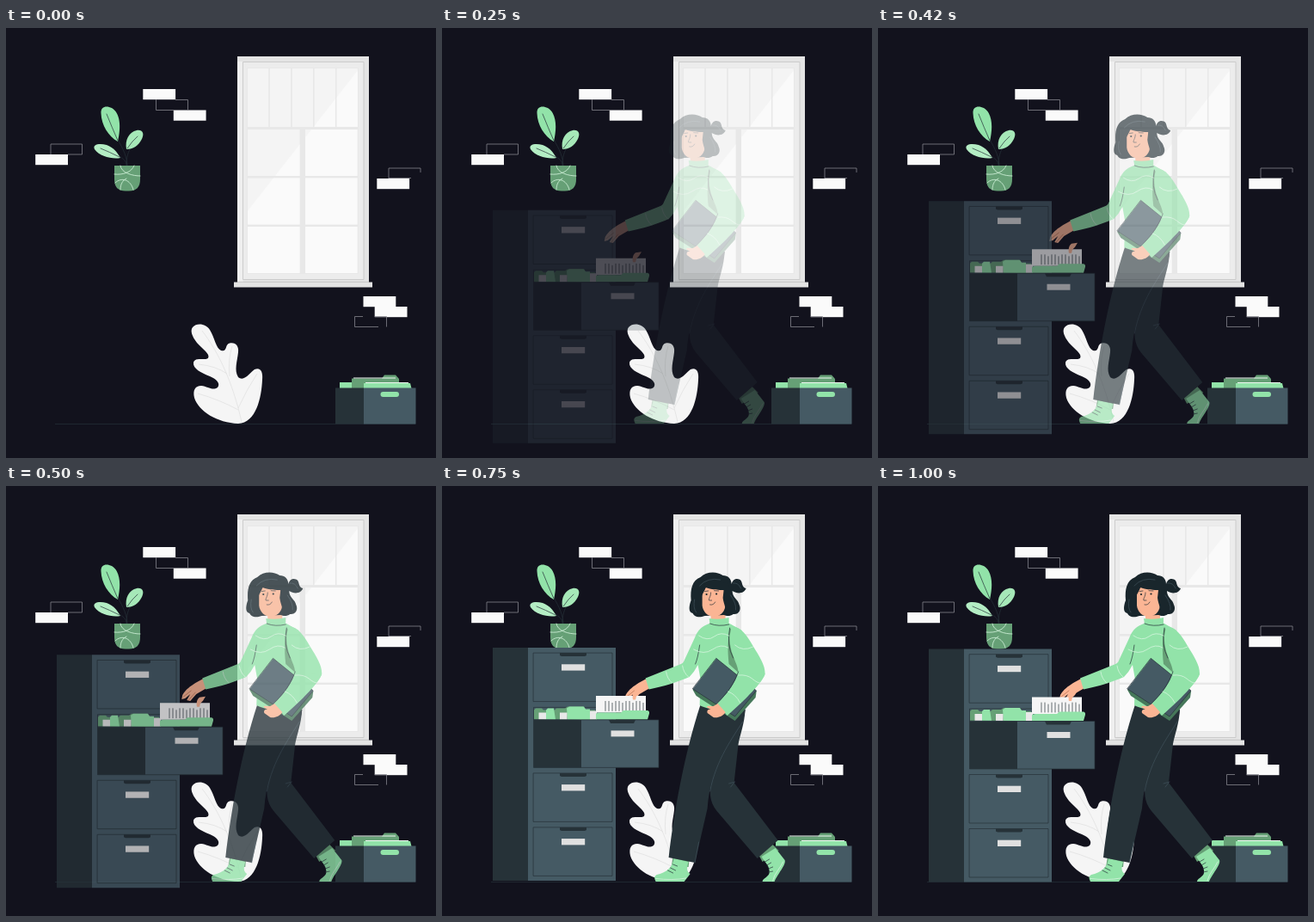
An HTML page that plays this animation: 500x500 px, repeating every 1.04 s.

```html
<!DOCTYPE html>
<html lang="en">
<head>
<meta charset="utf-8">
<title>Filing</title>
<style>
html, body { margin: 0; width: 100%; height: 100%; overflow: hidden; background: #12121d; }
svg { display: block; width: 100vw; height: 100vh; }
.dark { fill: #263238; }
.slate { fill: #455a64; }
.mint { fill: #92e3a9; }
.moss { fill: #66a076; }
.skin { fill: #fbb594; }
.line, .pale, .crease { fill: none; stroke-linecap: round; stroke-linejoin: round; }
.line { stroke: #263238; stroke-width: .7; }
.pale { stroke: #d6f5df; stroke-width: .8; }
.crease { stroke: #465862; stroke-width: .6; }
</style>
</head>
<body>
<svg viewBox="0 0 500 500">
  <path d="M57 460.5H476" stroke="#263238" stroke-width=".7"/>

  <g id="window">
    <path d="M269 33H422V296H269Z" fill="#e4e4e4"/>
    <path d="M269 39H275.500V296H269Z" fill="#efefef"/>
    <path d="M275.5 39.5H416V292.5H275.5Z" fill="#ececec" stroke="#c4c4c4" stroke-width=".8"/>
    <path d="M280 46H410V286H280Z" fill="#e8e8e8"/>
    <g id="panes" fill="#f4f4f4"></g>
    <g id="shine" fill="#fafafa" clip-path="url(#glare)"></g>
    <clipPath id="glare"><path d="M410 48L280 214V286H410Z"/></clipPath>
    <path d="M265 295.500H426V301.500H265Z" fill="#e3e3e3"/>
    <path d="M269 295.300H422" stroke="#bdbdbd" stroke-width=".8"/>
  </g>

  <g id="bricks" fill="#fafafa"></g>
  <g fill="none" stroke="#85858c" stroke-width=".8">
    <path d="M174.500 83V95.500H195M197 83.500H211.500V95.500"/>
    <path d="M52 147V135H88.500V147H72"/>
    <path d="M445 175V163H460M460 163H482V168M445 174.500H471"/>
    <path d="M415 335.500H405.500V347.500H433M429 335.500H442.500V347.500"/>
  </g>

  <g id="houseplant">
    <path class="line" d="M141 161C141 150 136 140 130 130M141 161C140 155 136 151 131 149M140 160C140 150 142 144 146 137"/>
    <path class="mint" d="M130 132C119 126 111 113 110.500 99C110 91 117 90 123 93C133 99 134 115 130 132Z"/>
    <path fill="#b4edc4" d="M133 151C124 153 108 149 103 141C100 135 109 134 117 136C125 139 129 144 133 151Z"/>
    <path fill="#a6e8b8" d="M140 141C138 130 143 121 152 119C159 118 161 123 158 129C154 137 148 141 140 141Z"/>
    <path class="line" d="M130 131Q123 115 117 100M132 150Q120 144 110 140M141 140Q147 131 153 126"/>
    <path class="moss" d="M126 160H156V176Q156 189.500 143 189.500H139Q126 189.500 126 176Z"/>
    <path class="pale" d="M126 170C136 171 146 168 149 160M133 160C134 169 148 172 156 172M127 180C134 173 145 176 148 188M133 188C133 181 136 177 140 175"/>
  </g>

  <g id="leaf">
    <path fill="#f5f5f5" d="M270 460C246 459 224 446 219 430C217 421 220 416 227 416C235 417 240 422 246 418C250 413 244 408 237 405C227 401 217 396 218 389C220 382 230 387 235 384C238 379 228 373 222 366C216 358 214 352 217 348C222 342 233 344 237 351C243 361 244 372 250 375C258 377 254 368 260 366.500C267 365 271 370 270 377C269 387 265 398 270 406C277 412 284 400 289 397C296 394 299 400 298 409C297 430 291 459 270 460Z"/>
    <path fill="none" stroke="#dedede" stroke-width=".7" d="M228 352C247 377 263 410 274 458M224 391Q244 393 257 402M263 370Q258 385 260 405M223 425Q248 432 270 444M292 402Q280 420 270 442"/>
  </g>

  <g id="box">
    <path class="mint" d="M388 412H403V419H388Z"/>
    <path class="moss" d="M402 419V407.500H437L440 403.500H453L457 408V419Z"/>
    <path class="mint" d="M416 413H470L471.500 419H416Z"/>
    <path d="M404 407H453M418 412.500H468" stroke="#f0faf3"/>
    <path class="dark" d="M383 418.500H416V460.500H383Z"/>
    <path class="slate" d="M416 418.500H476.500V460.500H416Z"/>
    <rect class="mint" x="435.500" y="423" width="21.500" height="6" rx="3"/>
  </g>

  <g id="woman">
    <g id="shoes">
      <path class="moss" d="M267 431L286 434L285 443H265Z"/>
      <path class="mint" d="M268 433L285 437C282 446 284 449 287 451L280 460H247C245 456 245 454 248 452C259 450 267 443 268 433Z"/>
      <path class="pale" d="M247 456.500C259 458 272 458 282 456"/>
      <path class="line" d="M264 444L270 447M261 447L267 450M267 440L272 442"/>
      <path class="moss" d="M366 428L383 417L390 424L371 437Z"/>
      <path class="mint" d="M370 431L386 421L397 435C399 440 388 452 385 460H371C371 456 378 455 379 450C380 442 374 438 370 431Z"/>
      <path class="pale" d="M395 437C392 444 385 450 383 459"/>
      <path class="line" d="M374 437L379 434M376 441L381 438M378 445L383 443M378 449L383 448"/>
    </g>

    <g id="trousers">
      <path class="dark" d="M309 260L351 260C350 277 345 289 343 300L338 345L389 412L365 433L318 378C309 367 309 355 312 340Z"/>
      <path class="dark" d="M299 254C314 261 335 263 351 260C350 275 339 288 330 302C316 326 309 348 307 375L292.500 438L262 432C268 380 280 312 299 254Z"/>
      <path class="crease" d="M348 274C337 292 317 318 310 355M339 344L332 346M338 345L334 350M297 414L292.500 438"/>
    </g>

    <g id="body">
      <path class="skin" d="M238 223L227 229C221 233 216 236 212 243L211 248L215 247L221 242L217 249L221 250L228 242L240 235Z"/>
      <path class="line" style="stroke:#b56e51" d="M213 245L222 238M219 249L227 240"/>
      <path class="mint" d="M309 160C301 163 296 167 292.500 176L280 203Q279 206 275 207.500L235 223.500L239 236.500C257 233 272 228 286 222Q292 216 296 208L299 225L298 255C310 261 332 263 345 256L347 168L333 160Z"/>
      <path class="moss" d="M333 165L349 182L343 217L332 207C330 191 331 177 333 165Z"/>
      <path class="mint" d="M335 163C347 164 353 174 360 186C368 199 374 208 374 218C373 226 350 250 330 267L319 253C332 240 341 226 343 216C342 205 332 194 333 174Z"/>
      <path class="skin" d="M311 143H328V157H311Z"/>
      <path class="mint" d="M309 154Q321 156 332 153V162Q321 165 310 161Z"/>
      <path class="line" d="M310 160Q320 164 332 161M298 185Q296 200 293 207M333 165Q329 185 337 200"/>
      <path class="pale" d="M297 174Q307 181 315 175T332 174M291 190Q303 197 313 190T331 188M259 216Q260 224 266 229M278 209Q279 217 285 222M339 185Q348 193 360 187"/>
    </g>

    <g id="binder">
      <path fill="#46785a" d="M290 237L319 205L364 239L363 246L339 273L294 244Z"/>
      <path class="slate" d="M317.500 200.500L364 238L339 268L290 236Z"/>
      <path class="line" d="M317.500 200.500L364 238L339 268L290 236Z"/>
      <path class="mint" d="M343 216L374 218C373 226 350 250 330 267L318 253C331 241 340 228 343 216Z"/>
      <path class="line" d="M343 216C338 229 332 239 318 253"/>
      <path class="pale" d="M343 220Q353 219 359 224T368 229M331 239Q340 242 345 252"/>
      <path class="skin" d="M319 253L328 263C325 268 319 270 314 269L307 264C306 261 308 259 311 260L306 257C307 255 311 256 314 256Z"/>
    </g>

    <g id="head" fill="#19262c">
      <path d="M304 151C296 154 291 151 290 148C284 147 286 138 288 133C287 120 289 110 299 106C306 99 318 99 325 104C331 104 335 108 335 114C337 107 343 107 346 110C348 113 347 118 352 119C350 125 342 126 336 122C336 130 343 132 344 138C347 144 343 150 337 149C333 152 329 151 326 150Z"/>
      <path class="skin" d="M301 123C303 115 322 113 326 120L328 133C329 143 325 149 319 151C310 154 302 148 301 139Z"/>
      <path d="M299 132C301 125 304 122 305 118C313 121 322 121 326 121L325 130C326 138 330 144 328 149L341 143L331 113L303 108L295 116Z"/>
      <circle cx="306" cy="126" r="1.100"/>
      <circle cx="317.500" cy="125.500" r="1.100"/>
      <path class="line" d="M304 122.500L308 122M315 121.700L320 122M311 124C311 129 308 131 309 133H312M310 138Q314 139 316 135"/>
      <path class="crease" d="M298 116Q307 106 322 109M292 132Q290 142 294 147M334 127Q341 137 340 144M337 113Q343 112 346 119"/>
    </g>
  </g>

  <g id="cabinet">
    <path class="dark" d="M59 189.500H100V460.500H59Z"/>
    <path class="slate" d="M100 189.500H202V460.500H100Z"/>
    <g id="drawers"></g>
    <path class="dark" d="M106.500 259H162V329H106.500Z"/>
    <path class="slate" d="M106 255H198V273.500H106Z"/>
    <path class="line" d="M106.500 273V259H198V273"/>
    <path class="moss" d="M107 273V262L109 260H116L118 262H131L133 260H143L146 258H164L167 262H178V273Z"/>
    <path class="mint" d="M121 273V262L123 260H130L132 273ZM146 273L145 260L148 258H165L167 261H172V273Z"/>
    <path fill="#e8e8e8" d="M112.500 265H121V273H112.500ZM137 265H145.500V273H137ZM172 263H180V273H172Z"/>
    <path fill="#f5f5f5" d="M179 245.500H237V265H179Z"/>
    <path id="print" class="line"/>
    <path class="skin" d="M222 250C221 246 222 241 225 239L232 238L229 243L226 246L225 250Z"/>
    <path class="mint" d="M179 273V266L183 265H208L211 262.500H239Q241.500 263 241 266L239 273Z"/>
    <path class="slate" d="M162 273.500H252V329H162Z"/>
    <path class="line" d="M162 273.500H252V329H106.500V273.500Z"/>
    <path class="dark" d="M194 273.500H225L223 277.500H196Z"/>
    <path fill="#e0e0e0" d="M196.500 286H223.500V293H196.500Z"/>
  </g>
</svg>
<script>
const $ = id => document.getElementById(id);
const rect = (x, y, w, h) => `<rect x="${x}" y="${y}" width="${w}" height="${h}"/>`;

let panes = '';
for (let i = 0; i < 5; i++) panes += rect(281 + i * 25.9, 47, 24.2, 68);
for (let i = 0; i < 3; i++)
  for (const x of [281, 348]) panes += rect(x, 118 + i * 56.5, 60.5, 54);
$('panes').innerHTML = $('shine').innerHTML = panes;

$('bricks').innerHTML = [[159.3, 71], [194.8, 95.5], [34.2, 147], [431.3, 175], [415.5, 312], [428.7, 324]]
  .map(([x, y]) => rect(x, y, 37.8, 12.2)).join('');

$('drawers').innerHTML = [195.7, 335.5, 398.5].map(y => `
  <path class="line" d="M106.5 ${y}H198V${y + 56.5}H106.5Z"/>
  <path class="dark" d="M137 ${y}H168V${y + 3}L166 ${y + 4}H139L137 ${y + 3}Z"/>
  <g fill="#e0e0e0">${rect(139, y + 13.2, 27.2, 7.3)}</g>`).join('');

let print = '';
for (let x = 190; x < 235; x += 4) print += `M${x} ${x % 3 ? 252 : 254}V263`;
$('print').setAttribute('d', print);

const curve = (s, a, b) => 3 * (1 - s) ** 2 * s * a + 3 * (1 - s) * s * s * b + s ** 3;

// cubic-bezier(.36, -.01, .5, 1.38)
function ease(p) {
  let lo = 0, hi = 1;
  for (let i = 0; i < 24; i++) {
    const mid = (lo + hi) / 2;
    if (curve(mid, .36, .5) < p) lo = mid; else hi = mid;
  }
  return curve(hi, -.01, 1.38);
}

const LOOP = 1040, FPS = 24, EMPTY_STEPS = 3;
const start = performance.now();

function draw(now) {
  const t = Math.max(0, now - start) % LOOP;
  const step = Math.floor(t * FPS / 1000 + .1);
  const v = step < EMPTY_STEPS ? 0 : ease(Math.min(1, (step + .4) / FPS));
  const shift = 30 * (1 - v);
  const place = (id, x, y) => {
    $(id).setAttribute('transform', `translate(${x} ${y})`);
    $(id).setAttribute('opacity', Math.min(1, v));
  };
  place('woman', -shift, 0);
  place('cabinet', 0, shift);
  requestAnimationFrame(draw);
}
draw(start);
</script>
</body>
</html>
```
